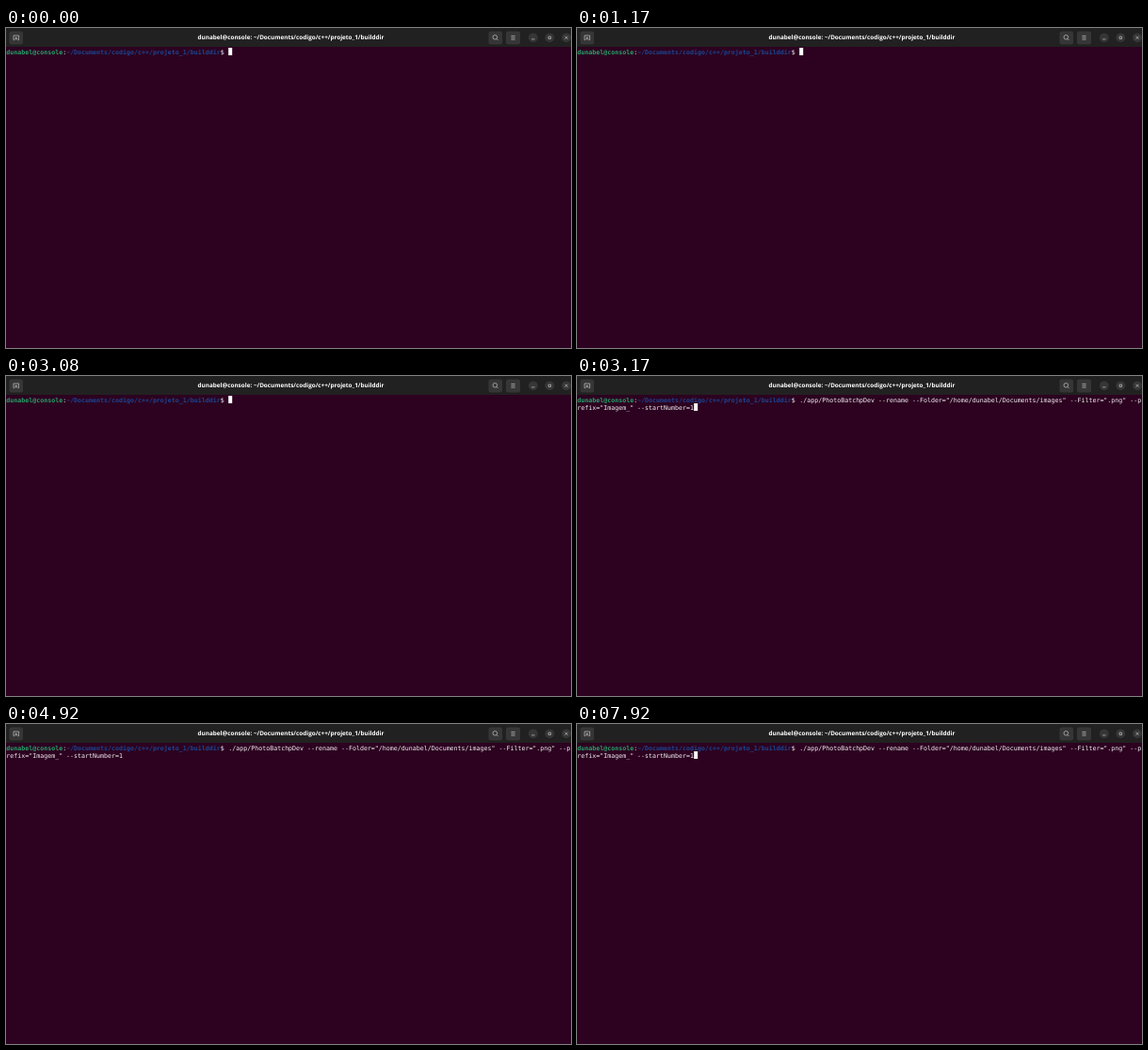
These frames come from a looping animation (600 by 340 pixels, 8 s). An HTML page:

```html
<!DOCTYPE html>
<html lang="pt">
<head>
<meta charset="utf-8">
<title>Terminal</title>
<style>
html, body { margin: 0; width: 100%; height: 100%; overflow: hidden; background: #2c0220; }
svg { display: block; width: 600px; height: 340px; }
text { white-space: pre; text-rendering: geometricPrecision; }
.title { font: bold 6.36px "Open Sans", sans-serif; fill: #fff; text-anchor: middle; }
.term { font: 6.645px "DejaVu Sans Mono", monospace; fill: #f4f0f3; }
.host { font-weight: bold; fill: #26a269; }
.path { font-weight: bold; fill: #1c4590; }
.button { fill: #363636; }
.icon { fill: none; stroke: #d0d0d0; stroke-width: .65; }
.cursor { fill: #fff; animation: blink 8s step-end infinite, jump 8s step-end infinite; }
.command { animation: paste 8s step-end infinite; }

@keyframes blink {
  0%, 14.625%, 29.125%, 38.5%, 54.125%, 68.75%, 83.375%, 99%, 100% { opacity: 1; }
  7.25%, 21.875%, 36.5%, 45.875%, 61.5%, 76%, 91.625% { opacity: 0; }
}
@keyframes jump {
  0% { transform: translate(236px, 21px); }
  39.625%, 100% { transform: translate(124px, 29px); }
}
@keyframes paste {
  0% { opacity: 0; }
  39.625%, 100% { opacity: 1; }
}
</style>
</head>
<body>
<svg viewBox="0 0 600 340">
  <rect width="600" height="340" fill="#2c0220"/>
  <rect width="600" height="20" fill="#212121"/>

  <g class="button">
    <rect x="3.5" y="3.5" width="14.5" height="14" rx="2"/>
    <rect x="512.5" y="3.5" width="14.5" height="14" rx="2"/>
    <rect x="531" y="3.5" width="15" height="14" rx="2"/>
    <circle cx="559.8" cy="10.3" r="4.9"/>
    <circle cx="577.3" cy="10.3" r="4.9"/>
    <circle cx="595" cy="10.3" r="4.9"/>
  </g>
  <g class="icon">
    <path d="M9.2 12.7H8V8H13.6V12.7H12.4M10.8 9.4V12.7M9.2 11H12.4"/>
    <circle cx="519.3" cy="9.8" r="2.3"/>
    <path d="M521 11.5L522.5 13M536.4 8.4H540.6M536.4 10.3H540.6M536.4 12.2H540.6"/>
    <path d="M558.1 11.9H561.5M576.1 9.1H578.5V11.5H576.1ZM593.4 8.7L596.6 11.9M596.6 8.7L593.4 11.9"/>
  </g>
  <text class="title" x="302.5" y="12.4">dunabel@console: ~/Documents/codigo/c++/projeto_1/builddir</text>

  <text class="term" x=".3" y="27.8"><tspan class="host">dunabel@console</tspan>:<tspan class="path">~/Documents/codigo/c++/projeto_1/builddir</tspan>$</text>
  <g class="term command">
    <text x="236.3" y="27.8">./app/PhotoBatchpDev --rename --Folder="/home/dunabel/Documents/images" --Filter=".png" --p</text>
    <text x=".3" y="35.8">refix="Imagem_" --startNumber=1</text>
  </g>
  <rect class="cursor" x=".2" width="4" height="8"/>
</svg>
</body>
</html>
```
